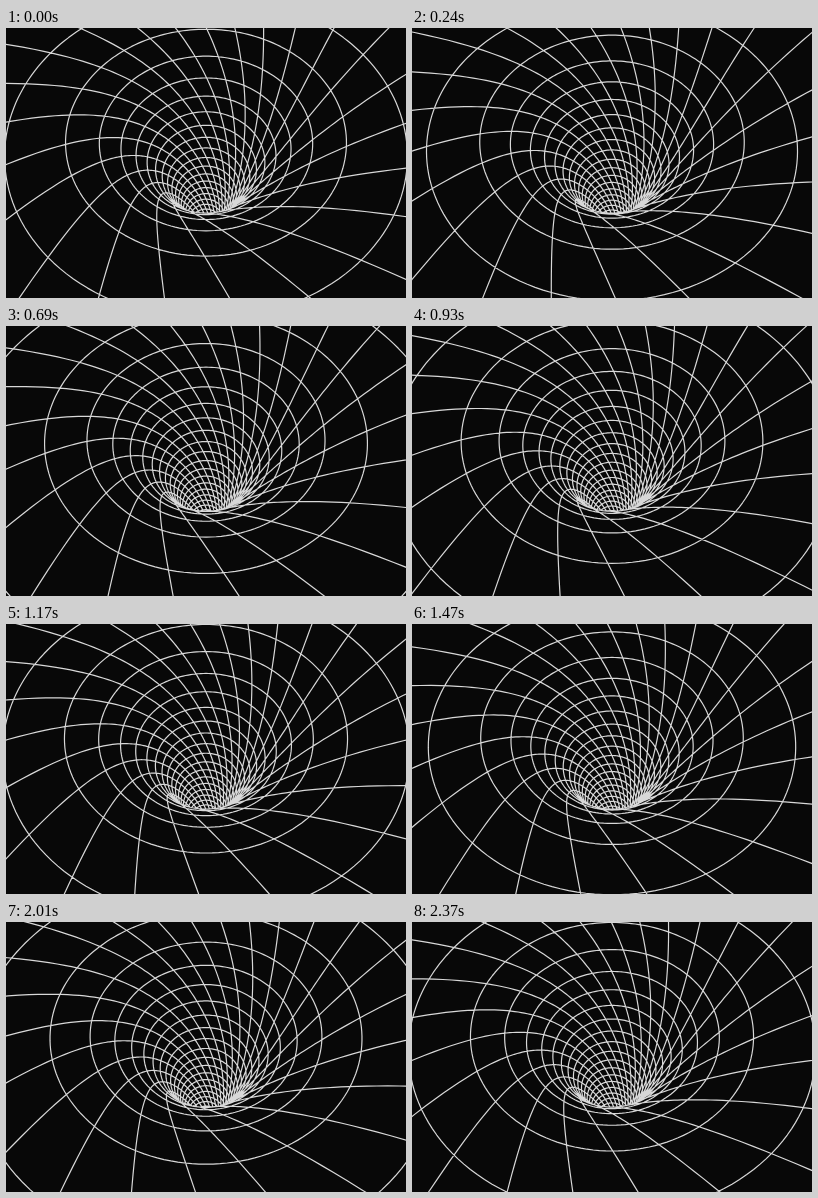
Write an HTML page with a canvas that moves like this. It is 400 px wide and 270 px high and loops after 2400 ms.

```html
<!DOCTYPE html>
<html lang="en">
<head>
<meta charset="utf-8">
<title>Gravity well</title>
<style>
  html, body { margin: 0; width: 100%; height: 100%; overflow: hidden; background: #080808; }
  canvas { display: block; width: 400px; height: 270px; }
</style>
</head>
<body>
<canvas id="stage" width="400" height="270"></canvas>
<script>
const ctx = document.getElementById('stage').getContext('2d');
const WIDTH = 400, HEIGHT = 270;
const LOOP = 2400, STEP = 30;
const RAD = Math.PI / 180;

// Camera: 50 degree field of view, looking down at 60 degrees from distance 1.
const FOCAL = HEIGHT / 2 / Math.tan(25 * RAD);
const SIN = Math.sin(60 * RAD), COS = Math.cos(60 * RAD);

const SPOKES = 24, SPACING = 360 / SPOKES;
const TWIST = 7.5;
const OUTER = -1.3, INNER = 20;

// The funnel narrows and sinks by power laws of the distance along it.
const along = level => 2.35 + 0.893 * level;
const radiusAt = level => along(level) ** -0.85;
const dropAt = level => 0.0468 * along(level) ** 1.1 - 0.4245;

function project(level, angle) {
  const radius = radiusAt(level), drop = dropAt(level);
  const across = -radius * Math.sin(angle);
  const away = -radius * Math.cos(angle);
  const depth = 1 + drop * SIN + away * COS;
  return {
    x: FOCAL * across / depth,
    y: FOCAL * (away * SIN - drop * COS) / depth,
    level
  };
}

// Openings of the funnel that can hide the surface below them.
const openings = [];
for (let level = 3; level < INNER; level += 0.4) {
  openings.push({ level, radius: radiusAt(level), drop: dropAt(level) });
}

// A point is visible when its sight line passes through every opening above it.
function isVisible({ x, y, level }) {
  for (const opening of openings) {
    if (opening.level > level - 0.05) break;
    const { radius, drop } = opening;
    const base = 1 + drop * SIN;
    const away = (y * base + FOCAL * COS * drop) / (FOCAL * SIN - y * COS);
    const across = x * (base + away * COS) / FOCAL;
    if (across * across + away * away > radius * radius * 1.002) return false;
  }
  return true;
}

function trace(count, pointAt) {
  let drawing = false;
  for (let i = 0; i <= count; i++) {
    const point = pointAt(i / count);
    const visible = isVisible(point);
    if (visible) {
      const x = WIDTH / 2 + point.x, y = HEIGHT / 2 - point.y;
      if (drawing) ctx.lineTo(x, y);
      else ctx.moveTo(x, y);
    }
    drawing = visible;
  }
}

function draw(time) {
  const progress = time / LOOP;
  const phase = progress * 2 % 1;
  const turn = 8 + progress * 3 * SPACING;

  ctx.fillStyle = '#080808';
  ctx.fillRect(0, 0, WIDTH, HEIGHT);
  ctx.strokeStyle = '#d8d8d8';
  ctx.lineWidth = 1.2;
  ctx.lineJoin = 'round';
  ctx.beginPath();

  for (let k = -1; k < INNER; k++) {
    trace(180, f => project(k + phase, f * 2 * Math.PI));
  }
  for (let s = 0; s < SPOKES; s++) {
    trace(160, f => {
      const level = OUTER + (INNER - OUTER) * f;
      return project(level, (turn + s * SPACING + level * TWIST) * RAD);
    });
  }
  ctx.stroke();
}

const start = performance.now();
function tick() {
  const elapsed = (performance.now() - start) % LOOP;
  draw(Math.floor(elapsed / STEP) * STEP);
  requestAnimationFrame(tick);
}
tick();
</script>
</body>
</html>
```
